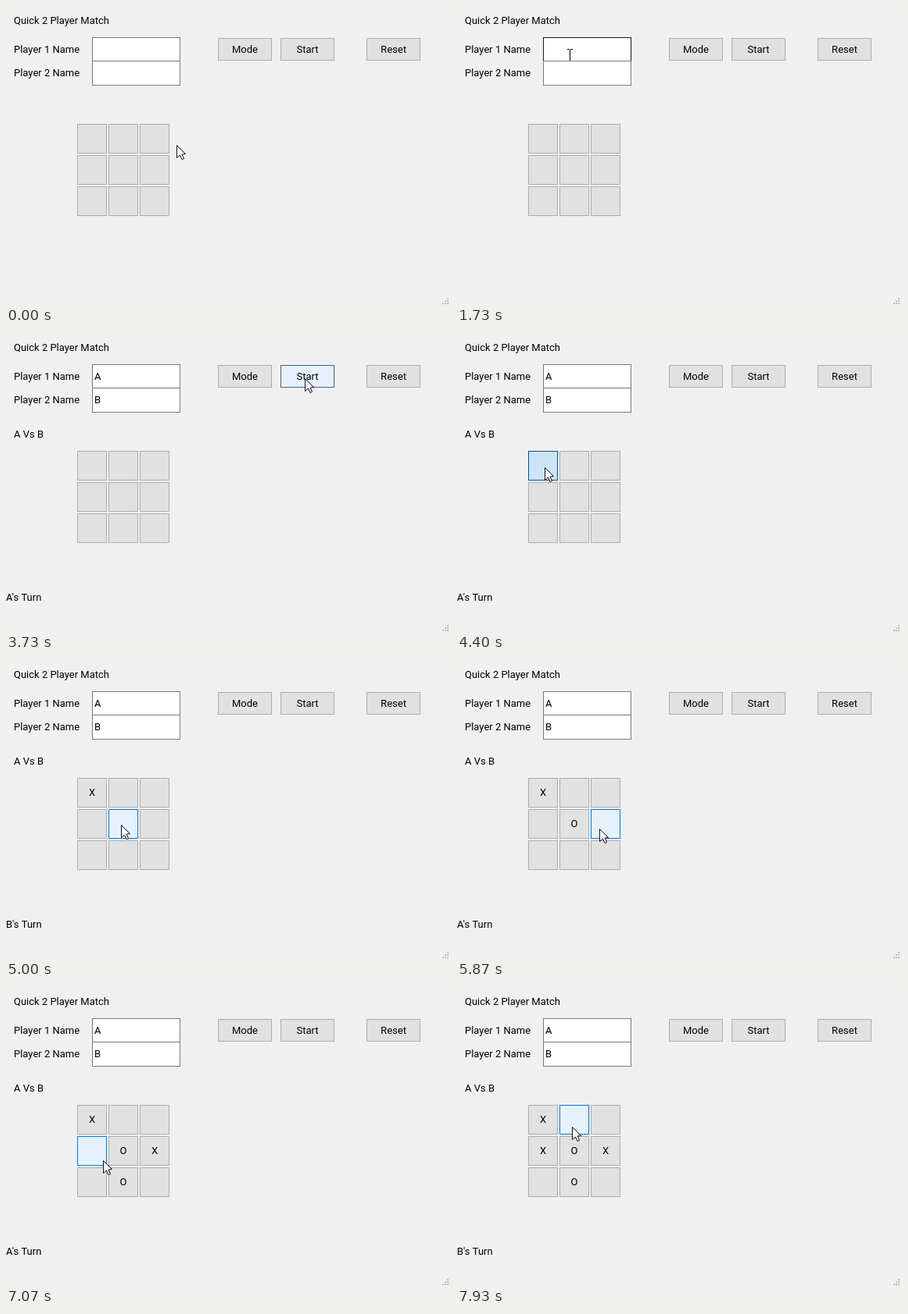
Recreate the animation shown at these times as an HTML page with a canvas. Size 569x383 px, loop 8 s.

```html
<!DOCTYPE html>
<html lang="en">
<head>
<meta charset="utf-8">
<title>Tic-tac-toe</title>
<style>
html, body { margin: 0; width: 100%; height: 100%; overflow: hidden; background: #f0f0f0; }
canvas { display: block; }
</style>
</head>
<body>
<canvas id="stage" width="569" height="383"></canvas>
<script>
const ctx = document.getElementById('stage').getContext('2d');
const LOOP = 8000, FPS = 15;

// Pointer path: time, x, y
const path = [
  [133, 218, 178], [800, 143, 60], [1000, 143, 60], [1200, 144, 61], [1600, 144, 61],
  [1733, 144, 63], [2133, 152, 93], [2333, 152, 93], [2400, 153, 100], [2600, 153, 100],
  [2933, 205, 146], [3467, 380, 60], [3733, 382, 58], [4267, 112, 172], [4600, 112, 172],
  [5000, 147, 211], [5400, 147, 211], [5867, 182, 216], [6000, 182, 216], [6267, 158, 243],
  [6467, 158, 243], [7067, 124, 222], [7333, 124, 222], [7933, 147, 179]
];

// Moves: time, cell, mark
const moves = [[4467, 0, 'X'], [5200, 4, 'O'], [6000, 5, 'X'], [6400, 7, 'O'], [7267, 3, 'X']];
const START = 3600, TYPE_A = 1800, TYPE_B = 2333;

const fields = [
  { x: 110, y: 40, w: 113, h: 31, text: 'A', typed: TYPE_A },
  { x: 110, y: 70, w: 113, h: 32, text: 'B', typed: TYPE_B }
];
const buttons = [['Mode', 271], ['Start', 351], ['Reset', 461]]
  .map(([text, x]) => ({ text, x, y: 41, w: 69, h: 29 }));
const cells = Array.from({ length: 9 }, (_, i) =>
  ({ x: 91 + i % 3 * 40, y: 151 + Math.floor(i / 3) * 40, w: 38, h: 38 }));

const between = (t, a, b) => t >= a && t < b;
const inside = (p, r) => between(p.x, r.x, r.x + r.w) && between(p.y, r.y, r.y + r.h);

function pointerAt(t) {
  const next = path.findIndex(k => k[0] > t);
  if (next < 1) {
    const [, x, y] = next ? path[path.length - 1] : path[0];
    return { x, y };
  }
  const [t0, x0, y0] = path[next - 1], [t1, x1, y1] = path[next];
  const u = (t - t0) / (t1 - t0), e = u * u * (3 - 2 * u);
  return { x: Math.round(x0 + (x1 - x0) * e), y: Math.round(y0 + (y1 - y0) * e) };
}

function box({ x, y, w, h }, fill, border) {
  ctx.fillStyle = border;
  ctx.fillRect(x, y, w, h);
  ctx.fillStyle = fill;
  ctx.fillRect(x + 1, y + 1, w - 2, h - 2);
}

function label(text, x, y, align = 'left') {
  ctx.fillStyle = '#000';
  ctx.textAlign = align;
  ctx.fillText(text, x, y);
}

function button(r, text, hover, pressed, hoverBorder) {
  if (pressed) box(r, '#cce4f7', '#005499');
  else if (hover) box(r, '#e5f1fb', hoverBorder);
  else box(r, '#e1e1e1', '#adadad');
  label(text, r.x + r.w / 2, r.y + Math.floor(r.h / 2) + 5 - (r.h > 30 ? 1 : 0), 'center');
}

function caret(x, y) {
  ctx.fillStyle = '#000';
  ctx.fillRect(x, y, 1, 16);
}

function beam({ x, y }) {
  ctx.globalCompositeOperation = 'difference';
  ctx.fillStyle = '#fff';
  ctx.fillRect(x, y - 7, 1, 14);
  for (const sy of [y - 8, y + 7]) {
    ctx.fillRect(x - 3, sy, 3, 1);
    ctx.fillRect(x + 1, sy, 3, 1);
  }
  ctx.globalCompositeOperation = 'source-over';
}

function arrow({ x, y }) {
  const shape = [[0, 0], [0, 16], [4, 12.5], [6.5, 18], [9, 17], [6.5, 11.5], [11, 11]];
  ctx.beginPath();
  for (const [dx, dy] of shape) ctx.lineTo(x + dx + .5, y + dy + .5);
  ctx.closePath();
  ctx.fillStyle = '#fff';
  ctx.fill();
  ctx.strokeStyle = '#101018';
  ctx.lineWidth = 1;
  ctx.stroke();
}

function draw(t) {
  const p = pointerAt(t);
  const done = moves.filter(m => t >= m[0] - 1);
  ctx.fillStyle = '#f0f0f0';
  ctx.fillRect(0, 0, 569, 383);
  ctx.font = '13px Roboto, Arial, sans-serif';

  label('Quick 2 Player Match', 10, 23);
  label('Player 1 Name', 10, 60);
  label('Player 2 Name', 10, 90);

  for (const f of fields) {
    box(f, '#fff', inside(p, f) ? '#171717' : '#7a7a7a');
    if (t >= f.typed - 1) label(f.text, 113, f.y + 20);
  }
  if (between(t, 999, 1530)) caret(113, 47);
  if (between(t, TYPE_A - 1, 2130)) caret(122, 47);
  if (between(t, 2130, TYPE_B - 1)) caret(113, 77);
  if (between(t, TYPE_B - 1, 2860)) caret(122, 77);

  for (const b of buttons) {
    const pressed = b.text === 'Start' && between(t, START - 68, START - 1);
    button(b, b.text, inside(p, b), pressed, '#4a6080');
  }
  cells.forEach((c, i) => {
    const mark = done.find(m => m[1] === i);
    const pressed = moves.some(m => m[1] === i && between(t, m[0] - 68, m[0] - 1));
    button(c, mark ? mark[2] : '', inside(p, c), pressed, '#0078d7');
  });

  if (t >= START - 1) {
    label('A Vs B', 10, 134);
    label((done.length % 2 ? 'B' : 'A') + "'s Turn", 0, 343);
  }

  // Resize grip
  ctx.fillStyle = '#bfbfbf';
  for (let r = 0; r < 3; r++)
    for (let c = 2 - r; c < 3; c++) ctx.fillRect(558 + c * 3, 374 + r * 3, 2, 2);

  fields.some(f => inside(p, f)) ? beam(p) : arrow(p);
}

const origin = performance.now();
function tick() {
  const t = (performance.now() - origin) % LOOP;
  draw(Math.floor(t * FPS / 1000 + .06) * 1000 / FPS);
  requestAnimationFrame(tick);
}
tick();
</script>
</body>
</html>
```
